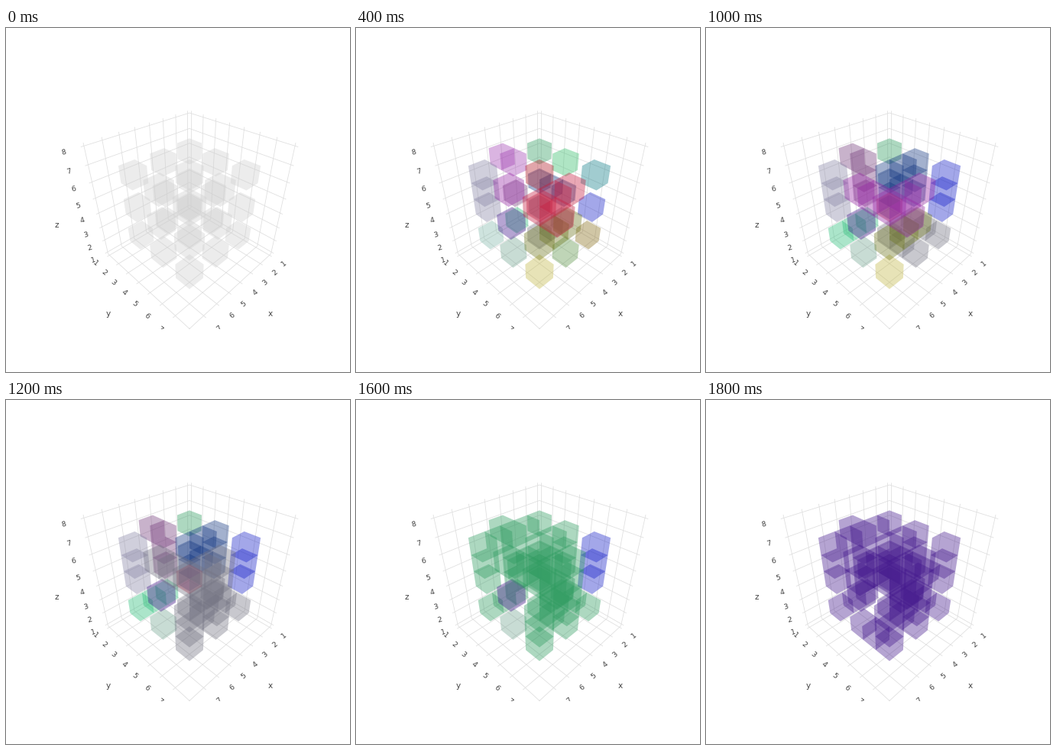
Animation of 450 by 450 pixels, one loop 2540 ms. Source, as a matplotlib script:

```python
from itertools import product

import matplotlib.pyplot as plt
import numpy as np
from matplotlib.animation import FuncAnimation
from matplotlib.collections import LineCollection, PolyCollection
from matplotlib.patches import Rectangle

SIZE = 450
FOCAL, CX, CY = 380, 240, 234
EYE = 1.25 * 3 ** 0.5
UNIT = 0.955 / 7          # one voxel in scene units
ALPHA = 0.39
GRAY = (206, 206, 206)

# Cells are named by their x, y, z index.
COLORS = {
    "000": (70, 90, 120), "001": (60, 60, 140), "002": (45, 155, 95),
    "010": (115, 115, 130), "011": (20, 55, 130), "012": (50, 190, 105),
    "020": (135, 108, 25), "021": (20, 30, 200), "022": (15, 125, 135),
    "100": (40, 190, 120), "101": (115, 58, 122), "102": (160, 62, 178),
    "110": (90, 140, 30), "111": (190, 40, 70), "112": (178, 25, 37),
    "120": (90, 148, 70), "121": (150, 90, 40), "122": (190, 50, 90),
    "200": (130, 185, 170), "201": (150, 140, 160), "202": (135, 132, 165),
    "210": (115, 165, 145), "211": (66, 22, 140), "212": (150, 40, 165),
    "220": (195, 185, 70), "221": (110, 118, 30), "222": (200, 30, 65),
}

# Walls removed in order; the first cell's colour takes over the joined set.
MERGES = [m.split("-") for m in (
    "202-201 222-122 221-121 011-001 010-110 001-000 101-102 100-200 011-012 "
    "010-020 021-022 012-112 212-222 110-120 221-220 120-121 121-122 100-101 "
    "101-001 121-111 002-102 112-111 102-202 011-021 220-210 211-212"
).split()]

# Openings in the outer wall, with the cell each belongs to.
DOORS = [((0, -3, 2), "102"), ((2, 3, 2), "222")]

HEXAGON = np.array([(-1, -1, 1), (1, -1, 1), (1, -1, -1),
                    (1, 1, -1), (-1, 1, -1), (-1, 1, 1)]) / 2


def project(p):
    x, y, z = np.moveaxis(np.asarray(p, float), -1, 0)
    scale = FOCAL / (EYE - (x + y + z) / 3 ** 0.5)
    return np.stack([CX + scale * (y - x) / 2 ** 0.5,
                     CY - scale * (2 * z - x - y) / 6 ** 0.5], -1)


def place(cell):
    """Voxel position of a cell, counted from the centre."""
    return np.array([2 * (int(c) - 1) for c in cell])


def voxels(step):
    """List of (position, colour) for the state after a number of steps."""
    if step == 0:
        return [(place(c), GRAY) for c in COLORS]
    owner = {c: c for c in COLORS}
    done = MERGES[:step - 1]
    for a, b in done:
        win, lose = owner[a], owner[b]
        owner = {c: win if o == lose else o for c, o in owner.items()}
    items = [(place(c), c) for c in COLORS]
    items += [((place(a) + place(b)) / 2, a) for a, b in done]
    items += [(np.array(p), c) for p, c in DOORS]
    return [(p, COLORS[owner[c]]) for p, c in items]


def shapes(step):
    items = sorted(voxels(step), key=lambda v: v[0].sum())
    polys = [project((p + HEXAGON) * UNIT) for p, _ in items]
    fills = [(*np.array(c) / 255, ALPHA) for _, c in items]
    return polys, fills


fig = plt.figure(figsize=(SIZE / 100, SIZE / 100), dpi=100, facecolor="white")
ax = fig.add_axes([0, 0, 1, 1])
ax.set_xlim(0, SIZE)
ax.set_ylim(SIZE, 0)
ax.axis("off")

ticks = [(v, (v - 4.5) * UNIT) for v in range(1, 9)]
lines = []
for wall, run in product(range(3), repeat=2):
    if wall == run:
        continue
    for _, t in ticks:
        ends = np.full((2, 3), t)
        ends[:, wall] = -0.5
        ends[:, run] = -0.5, 0.5
        lines.append(project(ends))
ax.add_collection(LineCollection(lines, colors="#dedede", linewidths=0.55,
                                 zorder=1))


def label(p, text, size, angle=0):
    x, y = project(p)
    ax.text(x, y, text, fontsize=size, rotation=angle, color="#444444",
            family="DejaVu Sans", ha="center", va="center_baseline"
            if not angle else "center", zorder=3)


def axis_text(t, gap):
    out = 0.5 + gap
    return (t, out, -0.5), (out, t, -0.5), (out, -0.5, t)


for v, t in ticks:
    for p, angle in zip(axis_text(t, 0.115), (40, -40, 15)):
        label(p, str(v), 6.8, angle)
for p, name in zip(axis_text(0, 0.29), "xyz"):
    label(p, name, 7.6)

# The scene is cut off at its lower edge.
ax.add_patch(Rectangle((0, 394), SIZE, SIZE - 394, fc="white", ec="none",
                       zorder=4))

cubes = PolyCollection([], edgecolors="none", linewidths=0, zorder=2)
ax.add_collection(cubes, autolim=False)
states = [shapes(s) for s in range(len(MERGES) + 2)]


def draw(frame):
    step = min(len(states) - 1, int((frame + 0.5) * 3 / 20))
    polys, fills = states[step]
    cubes.set_verts(polys)
    cubes.set_facecolor(fills)
    return [cubes]


anim = FuncAnimation(fig, draw, frames=254, interval=10, repeat=True,
                     repeat_delay=0, blit=False)
plt.show()
```
